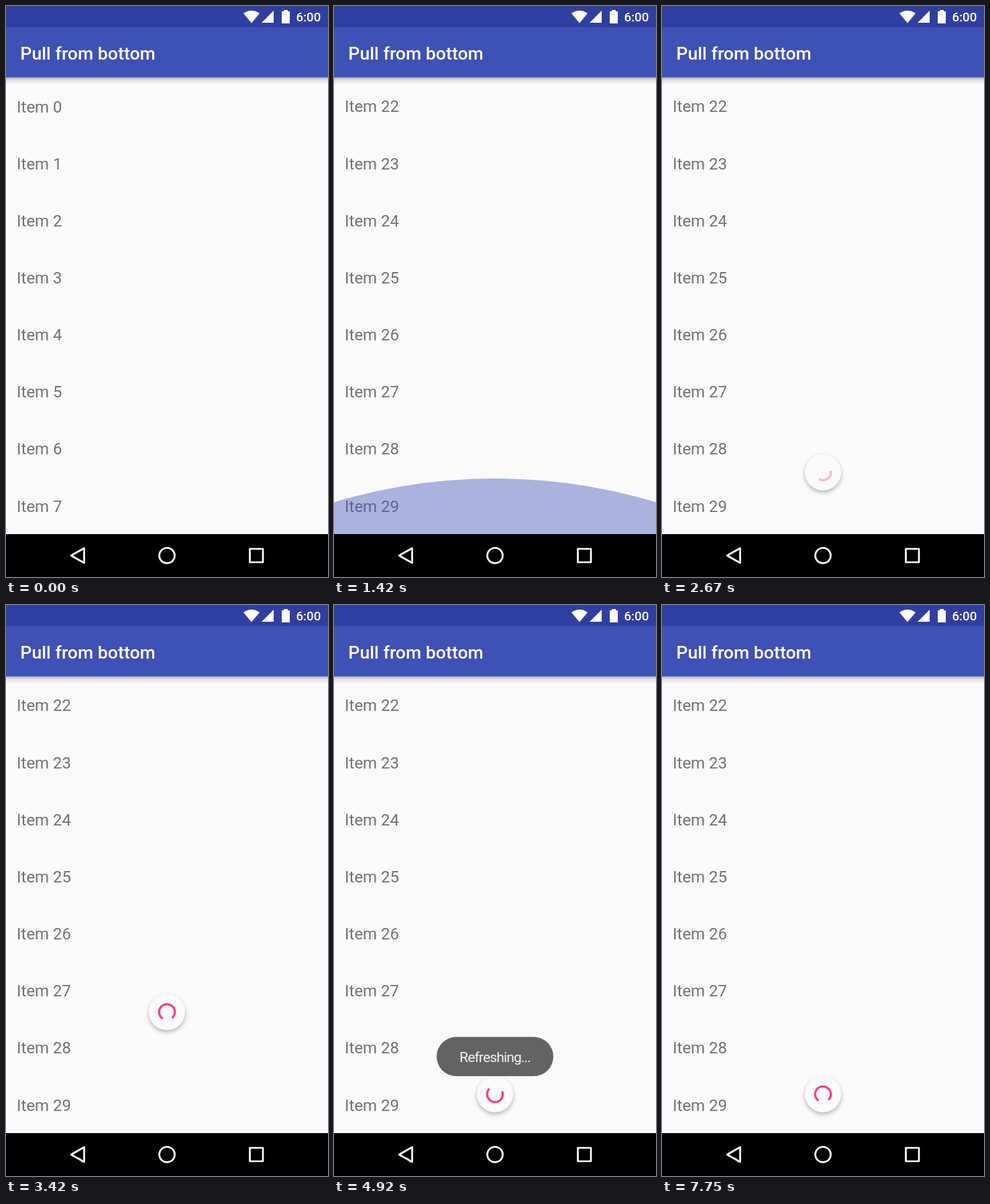
Write an HTML page that moves like this. It is 480 px wide and 852 px high and loops after 7830 ms.

```html
<!DOCTYPE html>
<html lang="en">
<head>
<meta charset="utf-8">
<title>Pull from bottom</title>
<style>
  html, body { margin: 0; width: 100%; height: 100%; overflow: hidden; background: #fafafa; }
  svg { display: block; width: 480px; height: 852px; font-family: Roboto, sans-serif; }
  #items { font-size: 24px; fill: #737373; }
  .title { font-size: 26.67px; font-weight: 500; fill: #fff; }
  .clock { font-size: 18.67px; font-weight: 500; fill: #fff; }
  .toast-text { font-size: 21px; letter-spacing: -.85px; fill: #f4f4f4; text-anchor: middle; }
  .nav { fill: none; stroke: #fff; stroke-width: 2.7; stroke-linejoin: round; }
  .disc { fill: #fafafa; filter: drop-shadow(0 3px 3px rgba(0, 0, 0, .27)); }
  #arc { fill: none; stroke: #ff4081; stroke-width: 3.3; }
</style>
</head>
<body>
<svg viewBox="0 0 480 852">
  <defs>
    <linearGradient id="fade" x2="0" y2="1">
      <stop offset="0" stop-opacity=".3"/>
      <stop offset=".4" stop-opacity=".1"/>
      <stop offset="1" stop-opacity="0"/>
    </linearGradient>
  </defs>

  <rect width="480" height="852" fill="#fafafa"/>
  <g id="items"></g>
  <ellipse id="glow" cx="240" rx="720" fill="#3f51b5"/>
  <g id="spinner">
    <circle class="disc" r="27"/>
    <path id="arc"/>
  </g>

  <rect y="106" width="480" height="12" fill="url(#fade)"/>
  <rect width="480" height="32" fill="#303f9f"/>
  <rect y="31.5" width="480" height="75" fill="#3f51b5"/>
  <text class="title" x="21.33" y="79.5">Pull from bottom</text>
  <g fill="#fff">
    <path d="M366 25.5L354 11Q366 2.5 378 11Z"/>
    <path d="M381 25H399V7Z"/>
    <path d="M411 8H414V6H420V8H423V26H411Z"/>
  </g>
  <text class="clock" x="432.5" y="23">6:00</text>

  <rect y="788" width="480" height="64" fill="#000"/>
  <g class="nav">
    <path d="M97 820L116.5 809V831Z"/>
    <circle cx="240" cy="820" r="11.5"/>
    <rect x="363.5" y="810" width="19.5" height="20"/>
  </g>

  <g id="toast">
    <rect x="153" y="644.5" width="174" height="58.5" rx="29.2" fill="#636363"/>
    <text class="toast-text" x="240" y="682">Refreshing...</text>
  </g>
</svg>
<script>
const LOOP = 7830, TICK = 250 / 3;
const ROW = 85.15, COUNT = 30, BOTTOM = 788, REST_Y = 730;
const SPIN_START = 3870, FINISH = 666, CYCLE = 1332;

const el = id => document.getElementById(id);
const [items, glow, spinner, arc, toast] =
  ['items', 'glow', 'spinner', 'arc', 'toast'].map(el);

const clamp = x => Math.min(1, Math.max(0, x));
const span = (t, from, to) => clamp((t - from) / (to - from));
const mix = (a, b, p) => a + (b - a) * p;
const decel = p => 1 - (1 - p) ** 2;

// cubic-bezier(.4, 0, .2, 1)
function fastOutSlowIn(x) {
  let lo = 0, hi = 1;
  for (let i = 0; i < 20; i++) {
    const u = (lo + hi) / 2, v = 1 - u;
    if (1.2 * u * v * v + .6 * u * u * v + u ** 3 < x) lo = u; else hi = u;
  }
  return lo * lo * (3 - 2 * lo);
}

for (let i = 0; i < COUNT; i++) {
  const row = document.createElementNS('http://www.w3.org/2000/svg', 'text');
  row.setAttribute('x', 16);
  row.setAttribute('y', 158.5 + i * ROW);
  row.textContent = 'Item ' + i;
  items.append(row);
}

function drawList(t) {
  const p = span(t, 690, 1190) ** 1.7;
  items.setAttribute('transform', `translate(0 ${-p * (COUNT - 8) * ROW})`);
}

function drawGlow(t) {
  const grow = decel(span(t, 1190, 1373));
  const left = (1 - span(t, 1373, 1973)) ** 2;
  const scale = grow * left;
  glow.setAttribute('ry', 720 * scale);
  glow.setAttribute('cy', BOTTOM + (720 - 96.5) * scale);
  glow.setAttribute('opacity', mix(.3, .5, grow) * left);
}

function pullY(t) {
  return t < 3080
    ? mix(752, 640, span(t, 2250, 3080))
    : mix(640, 606, decel(span(t, 3080, 3500)));
}

// Start angle and sweep of the arc, in degrees.
function arcAngles(t) {
  if (t < SPIN_START) {
    const y = pullY(t);
    const drag = clamp(((815 - y) / 177 - .4) * 5 / 3);
    const tension = clamp((640 - y) / 34);
    return [180 * (-.25 + .4 * drag) + 99 * tension, 288 * drag];
  }
  const spin = t - SPIN_START - FINISH;
  if (spin < 0) {
    const p = 1 + spin / FINISH;
    const sweep = mix(288, 4, p);
    return [mix(54, 250, p) - sweep, sweep];
  }
  const turns = spin / CYCLE, phase = turns % 1;
  const head = fastOutSlowIn(clamp(phase * 2));
  const tail = fastOutSlowIn(clamp(phase * 2 - 1));
  return [
    250 + 306 * turns + 288 * (Math.floor(turns) + tail),
    4 + 284 * (head - tail)
  ];
}

function arcPath(start, sweep) {
  const point = deg => {
    const a = deg * Math.PI / 180;
    return `${11.7 * Math.cos(a)} ${11.7 * Math.sin(a)}`;
  };
  return `M${point(start)}A11.7 11.7 0 ${sweep > 180 ? 1 : 0} 1 ${point(start + sweep)}`;
}

function drawSpinner(t) {
  const y = mix(pullY(t), REST_Y, decel(span(t, 3640, SPIN_START)));
  const [start, sweep] = arcAngles(t);
  spinner.setAttribute('visibility', t < 2245 ? 'hidden' : 'visible');
  spinner.setAttribute('transform', `translate(240 ${y})`);
  arc.setAttribute('d', sweep > 0 ? arcPath(start, sweep) : '');
  arc.setAttribute('opacity', mix(.35, 1, span(t, 2950, 3200)));
}

function drawToast(t) {
  const shown = decel(span(t, 3945, 4420));
  const gone = span(t, 5883, 6383) ** 2;
  toast.setAttribute('opacity', shown * (1 - gone));
}

// The screen refreshes twelve times a second.
function frame(now) {
  const t = Math.floor((now % LOOP + 3.4) / TICK) * TICK;
  drawList(t);
  drawGlow(t);
  drawSpinner(t);
  drawToast(t);
  requestAnimationFrame(() => frame(performance.now() - begin));
}

const begin = performance.now();
frame(0);
</script>
</body>
</html>
```
